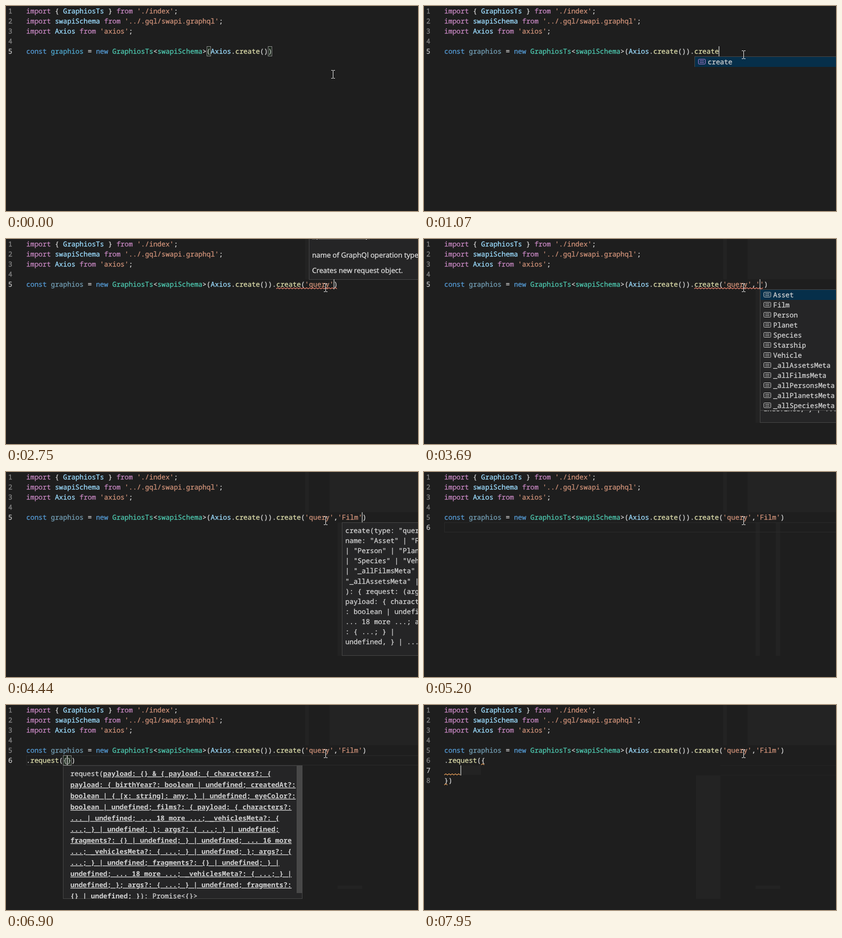
An HTML page for the animation above (8000 ms loop, 774 px wide and 387 px high).

```html
<!DOCTYPE html>
<html lang="en">
<head>
<meta charset="utf-8">
<title>Typed request in an editor</title>
<style>
html, body { margin: 0; width: 100%; height: 100%; overflow: hidden; background: #1e1e1e; }
svg { display: block; width: 774px; height: 387px; }
text { white-space: pre; text-rendering: geometricPrecision; stroke-width: .3px; font: 12.833px "Noto Sans Mono", "DejaVu Sans Mono", monospace; }
.prose { font: 13.2px "Open Sans", "Noto Sans", sans-serif; }
.bold { font-weight: 700; text-decoration: underline; stroke-width: 0; }
</style>
</head>
<body>
<svg id="stage" viewBox="0 0 774 387"></svg>
<script>
const LOOP = 8000, CH = 7.7, LEFT = 38, ROW = 19;
const C = {
  key: '#c586c0', word: '#569cd6', name: '#9cdcfe', type: '#4ec9b0',
  str: '#ce9178', fn: '#dcdcaa', text: '#d4d4d4', panel: '#252526',
  edge: '#454545', ghost: '#232323', prose: '#e4e4e4'
};

const colX = col => LEFT + col * CH;
const rowY = line => (line - 1) * ROW;
const esc = s => s.replace(/&/g, '&amp;').replace(/</g, '&lt;');
const rect = (x, y, w, h, fill, stroke) =>
  `<rect x="${x}" y="${y}" width="${w}" height="${h}" fill="${fill}"${stroke ? ` stroke="${stroke}"` : ''}/>`;
const text = (x, y, s, fill = C.text, cls = '') =>
  `<text x="${x}" y="${y}" fill="${fill}" stroke="${fill}" class="${cls}">${esc(s)}</text>`;
const path = (d, stroke, width = 1) =>
  `<path d="${d}" fill="none" stroke="${stroke}" stroke-width="${width}"/>`;
const panel = (x, y, w, h) => rect(Math.round(x) + .5, y + .5, w - 1, h - 1, C.panel, C.edge);

function codeLine(line, parts) {
  let col = 0, out = '';
  for (const [kind, s] of parts) {
    if (s.trim()) out += text(colX(col), rowY(line) + 14, s, C[kind] || kind);
    col += s.length;
  }
  return out;
}

// Colours calls, strings and punctuation
const tokens = s => (s.match(/'[^']*'?|\w+|[^\w']+/g) || [])
  .map(t => [t[0] === "'" ? 'str' : /\w/.test(t) ? 'fn' : 'text', t]);

const imports = [
  [['key', 'import'], ['text', ' { '], ['name', 'GraphiosTs'], ['text', ' } '], ['key', 'from '], ['str', "'./index'"], ['text', ';']],
  [['key', 'import '], ['name', 'swapiSchema '], ['key', 'from '], ['str', "'../.gql/swapi.graphql'"], ['text', ';']],
  [['key', 'import '], ['name', 'Axios '], ['key', 'from '], ['str', "'axios'"], ['text', ';']]
];
const head = unused => [
  ['word', 'const '], [unused ? '#729db3' : '#4fa8cf', 'graphios'], ['text', ' = '], ['word', 'new '],
  ['type', 'GraphiosTs'], ['text', '<'], ['type', 'swapiSchema'], ['text', '>('],
  ['name', 'Axios'], ['text', '.'], ['fn', 'create'], ['text', '())']
];

function squiggle([line, from, to, color]) {
  const y = rowY(line) + 18, end = colX(to);
  let d = `M${colX(from)} ${y}`;
  for (let x = colX(from) + 3, up = true; x <= end + 1; x += 3, up = !up) d += `L${x} ${up ? y - 2 : y}`;
  return path(d, color, 1.1);
}

function list({ x, line, items, sel = 0, w = 430, icon = '#c5c5c5' }) {
  const top = rowY(line + 1), left = Math.round(x);
  let out = panel(x, top, w, items.length * ROW + 1);
  out += rect(left + 1, top + sel * ROW + 1, w - 2, ROW, '#062f4a');
  items.forEach((item, i) => {
    const y = top + i * ROW;
    out += `<rect x="${left + 7.5}" y="${y + 5.5}" width="13" height="9" rx="1" fill="none" stroke="${icon}"/>`;
    out += path(`M${left + 10} ${y + 8.5}h8M${left + 10} ${y + 11.5}h8`, icon);
    out += text(left + 25, y + 15, item);
  });
  return out;
}

const opHint = x => panel(x, -20, 440, 97) +
  text(x + 6, -2, 'operation: any', C.text, 'bold') +
  text(x + 6, 35, 'name of GraphQl operation type', C.prose, 'prose') +
  text(x + 6, 64, 'Creates new request object.', C.prose, 'prose');

const nameLines = ['create(type: "query",', 'name: "Asset" | "Film"', '| "Person" | "Planet"',
  '| "Species" | "Vehicle"', '| "_allFilmsMeta" |', '"_allAssetsMeta" | ...', '): { request: (args',
  'payload: { characters?', ': boolean | undefined;', '... 18 more ...; args?', ': { ...; } |', 'undefined, } | ...'];
const nameHint = x => panel(x, 95, 440, 252) +
  nameLines.map((s, i) => text(x + 6.5, 115 + 19.1 * i, s)).join('');

const payload = ['payload: {} & { payload: { characters?: {',
  'payload: { birthYear?: boolean | undefined; createdAt?:', 'boolean | { [x: string]: any; } | undefined; eyeColor?:',
  'boolean | undefined; films?: { payload: { characters?:', '... | undefined; ... 18 more ...; _vehiclesMeta?: {',
  '...; } | undefined; }; args?: { ...; } | undefined;', 'fragments?: {} | undefined; } | undefined; ... 16 more',
  '...; _vehiclesMeta?: { ...; } | undefined; }; args?: {', '...; } | undefined; fragments?: {} | undefined; } |',
  'undefined; ... 18 more ...; _vehiclesMeta?: { ...; } |', 'undefined; }; args?: { ...; } | undefined; fragments?:',
  '{} | undefined; }'];

function requestHint([x, y, w]) {
  let out = panel(x, y, w, 252) + rect(x + w - 11, y, 11, 241, '#484848');
  out += text(x + 14, y + 20, 'request(');
  payload.forEach((s, i) => {
    out += text(x + 14 + (i ? 0 : 8 * CH), y + 20 + 21 * i, s, C.text, 'bold');
  });
  const last = payload.length - 1;
  out += text(x + 14 + payload[last].length * CH, y + 20 + 21 * last, '): Promise<{}>');
  return `<clipPath id="hint-clip">${rect(x, y, w, 252, '#fff')}</clipPath><g clip-path="url(#hint-clip)">${out}</g>`;
}

const docLines = ['(method) request(', 'payload: {} & {', 'payload: {', 'characters?: { ...; }', '| undefined; ...', '18 more ...; }'];
const docs = () => panel(475, 114, 231, 228) +
  docLines.map((s, i) => text(485, 133 + ROW * i, s)).join('');

const opList = { x: 569, line: 5, items: ['mutation', 'query', 'subscription'] };
const nameList = { x: 631, line: 5, items: ['Asset', 'Film', 'Person', 'Planet', 'Species', 'Starship', 'Vehicle',
  ...['Assets', 'Films', 'Persons', 'Planets', 'Species'].map(s => `_all${s}Meta`)] };
const callList = { x: 508, line: 5, items: ['create'], icon: '#b180d7' };
const requestList = { x: 46, line: 6, items: ['request'], icon: '#b180d7' };
const red = '#f48771', amber = '#e9a05a';
const bars = [[562, 0, 7, 76], [608, 0, 166, 76]];
const strip = [623, 95, 8, 252];
const stub = [623, 341, 46, 6];

// Each step changes part of the state from its time on
const steps = [
  [0, { tail: '', extra: [], line: 5, unused: false, caret: null, boxes: [[5, 44], [5, 59]], marks: [], ghosts: [] }],
  [150, { tail: '.', boxes: [], caret: [5, 61], list: callList }],
  [300, { tail: '.c', caret: [5, 62] }],
  [450, { tail: '.cr', caret: [5, 63], unused: true }],
  [600, { tail: '.cre', caret: [5, 64] }],
  [740, { tail: '.crea', caret: [5, 65] }],
  [890, { tail: '.creat', caret: [5, 66] }],
  [1040, { tail: '.create', caret: [5, 67] }],
  [1190, { list: null }],
  [1340, { tail: '.create()', caret: [5, 68], boxes: [[5, 67], [5, 68]] }],
  [1490, { op: 562, marks: [[5, 61, 69, red]] }],
  [1640, { tail: ".create('')", caret: [5, 69], boxes: [] }],
  [1800, { op: 569, list: opList, marks: [[5, 61, 71, red]], ghosts: [bars[0]] }],
  [2130, { list: { ...opList, sel: 1 } }],
  [2460, { tail: ".create('query')", caret: [5, 74], list: null, marks: [[5, 61, 76, red]] }],
  [2620, { caret: [5, 75] }],
  [2770, { tail: ".create('query',)", caret: [5, 76], op: null, ghosts: bars }],
  [2920, { names: 623 }],
  [3220, { tail: ".create('query','')", caret: [5, 77], names: 631, ghosts: [...bars, strip], marks: [[5, 61, 78, red]] }],
  [3370, { list: nameList }],
  [3840, { list: { ...nameList, sel: 1 } }],
  [4140, { tail: ".create('query','Film')", caret: [5, 81], list: null }],
  [4290, { marks: [], caret: [5, 82] }],
  [4600, { names: null, caret: [5, 83], ghosts: [...bars, strip, [661, 95, 8, 252]] }],
  [4750, { extra: [''], line: 6, caret: [6, 0] }],
  [5050, { caret: null }],
  [5350, { extra: ['.'], caret: [6, 1], list: requestList, docs: true, ghosts: [...bars, stub] }],
  [5500, { extra: ['.r'], caret: [6, 2] }],
  [5670, { extra: ['.re'], caret: [6, 3] }],
  [5820, { extra: ['.req'], caret: [6, 4] }],
  [5970, { extra: ['.request'], caret: [6, 8], list: null, docs: false }],
  [6130, { extra: ['.request()'], caret: [6, 9], boxes: [[6, 8], [6, 9]] }],
  [6430, { request: [107, 114, 450] }],
  [6750, { extra: ['.request({})'], caret: [6, 10], boxes: [[6, 9], [6, 10]] }],
  [7050, { extra: ['.request({', '', '})'], line: 7, caret: [7, 4], boxes: [], request: [69, 133, 442],
    marks: [[6, 9, 10, amber], [7, 0, 4, amber], [8, 0, 1, amber]],
    ghosts: [...bars, stub, [511, 133, 46, 233], [557, 114, 217, 1], [557, 132, 217, 1], [69, 114, 38, 18]] }],
  [7350, { caret: null }],
  [7650, { request: null }],
  [7800, { caret: [7, 4] }]
];

function mouse(t) {
  const tick = Math.floor(t / 150) * 150;
  const p = Math.min(1, Math.max(0, (tick - 450) / 600));
  const e = p * p * (3 - 2 * p);
  const x = Math.round(614 - 14 * e) + .5, y = Math.round(129 - 37 * e);
  return path(`M${x - 3.5} ${y - 7.5}h3M${x + .5} ${y - 7.5}h3M${x} ${y - 7}v14M${x - 3.5} ${y + 7.5}h3M${x + .5} ${y + 7.5}h3`, '#e8e8e8');
}

function draw(t) {
  const s = {};
  for (const [at, change] of steps) if (at <= t) Object.assign(s, change);
  let out = rect(0, 0, 774, 387, '#1e1e1e');
  out += s.ghosts.map(g => rect(...g, C.ghost)).join('');
  if (s.line === 6) out += rect(38.5, 95.5, 760, 18, 'none', '#2a2a2a');
  for (let n = 1; n <= 5 + s.extra.length; n++)
    out += text(4.3, rowY(n) + 14, String(n), n === s.line ? '#c6c6c6' : '#858585');
  imports.forEach((parts, i) => out += codeLine(i + 1, parts));
  out += codeLine(5, [...head(s.unused), ...tokens(s.tail)]);
  s.extra.forEach((line, i) => out += codeLine(6 + i, tokens(line)));
  out += s.marks.map(squiggle).join('');
  for (const [line, col] of s.boxes)
    out += rect(Math.round(colX(col)) + .5, rowY(line) + .5, 7, 18, 'rgba(0,100,0,.1)', '#888');
  if (s.op) out += opHint(s.op);
  if (s.names) out += nameHint(s.names);
  if (s.request) out += requestHint(s.request);
  if (s.list) out += list(s.list);
  if (s.docs) out += docs();
  if (s.caret) out += rect(Math.round(colX(s.caret[1])) - .5, rowY(s.caret[0]), 1.5, ROW, '#aeafad');
  return out + mouse(t);
}

const stage = document.getElementById('stage');
const start = performance.now();
let shown = '';
function frame() {
  const next = draw((performance.now() - start) % LOOP);
  if (next !== shown) stage.innerHTML = shown = next;
  requestAnimationFrame(frame);
}
frame();
</script>
</body>
</html>
```
